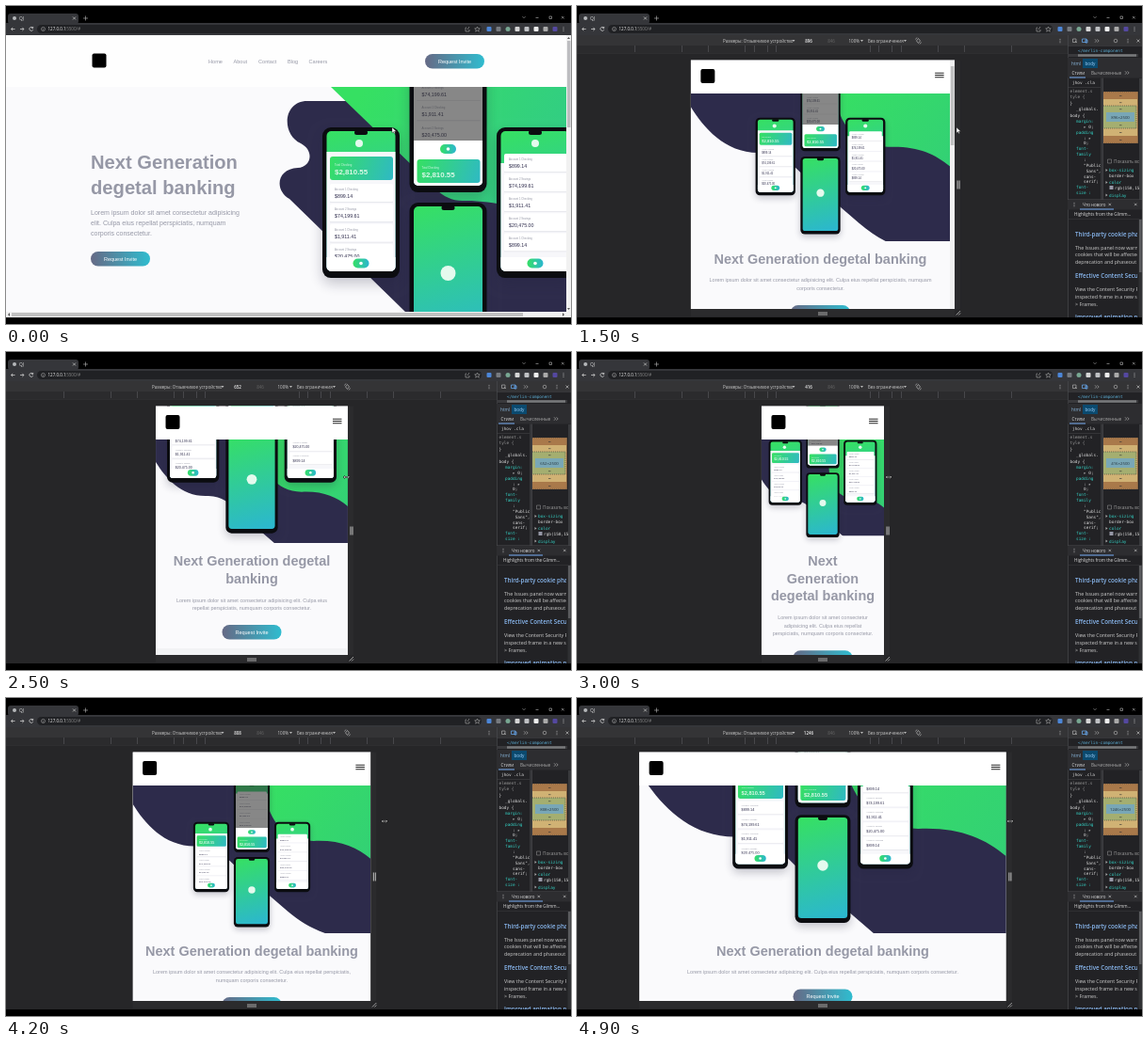
Write an HTML page with a canvas that moves like this. It is 600 by 338 pixels and loops after 5 s.

```html
<!DOCTYPE html>
<html lang="en">
<head>
<meta charset="utf-8">
<title>Responsive banking page</title>
<style>
html, body { margin: 0; width: 100%; height: 100%; overflow: hidden; background: #000; }
canvas { display: block; }
</style>
</head>
<body>
<canvas id="stage" width="600" height="338"></canvas>
<script>
const ctx = document.getElementById('stage').getContext('2d');
const LOOP = 5000, STEP = 100;
const SANS = '"Liberation Sans", Arial, sans-serif';
const UI = '"Open Sans", sans-serif';
const MONO = '"DejaVu Sans Mono", monospace';
const GRAY = '#9698a6', NAVY = '#2d2b4b', GREEN = '#36e062', TEAL = '#2bb5d3', PAPER = '#fafafc';
const LOREM = 'Lorem ipsum dolor sit amet consectetur adipisicing elit. Culpa eius repellat perspiciatis, numquam corporis consectetur.';
const TITLE = 'Next Generation degetal banking';

// Viewport width in CSS pixels and pointer position over time.
const WIDTHS = [[1600, 896], [2200, 794], [3000, 416], [3200, 400], [3600, 524], [4200, 808], [4900, 1246]];
const POINTER = [[1200, 410], [1500, 403], [1600, 403], [2200, 380], [3000, 331], [3200, 329], [3600, 351], [4200, 402], [4900, 460]];

function track(keys, t) {
  if (t <= keys[0][0]) return keys[0][1];
  for (let i = 1; i < keys.length; i++) {
    const [t0, a] = keys[i - 1], [t1, b] = keys[i];
    if (t <= t1) return a + (b - a) * (t - t0) / (t1 - t0);
  }
  return keys[keys.length - 1][1];
}

function rect(x, y, w, h, fill, r = 0) {
  ctx.fillStyle = fill;
  ctx.beginPath();
  ctx.roundRect(x, y, w, h, r);
  ctx.fill();
}

function dot(x, y, r, fill) {
  rect(x - r, y - r, 2 * r, 2 * r, fill, r);
}

function stroke(path, color, width = 1) {
  ctx.strokeStyle = color;
  ctx.lineWidth = width;
  ctx.stroke(new Path2D(path));
}

function fillPath(path, fill) {
  ctx.fillStyle = fill;
  ctx.fill(new Path2D(path));
}

function clipped(x, y, w, h, draw, r = 0) {
  ctx.save();
  ctx.beginPath();
  ctx.roundRect(x, y, w, h, r);
  ctx.clip();
  draw();
  ctx.restore();
}

// y is the vertical middle of the line.
function text(s, x, y, size, color, { font = SANS, weight = 400, align = 'left' } = {}) {
  ctx.font = `${weight} ${size}px ${font}`;
  ctx.textAlign = align;
  ctx.fillStyle = color;
  ctx.fillText(s, x, y + size * 0.35);
}

function wrap(s, size, weight, maxWidth) {
  ctx.font = `${weight} ${size}px ${SANS}`;
  const lines = [];
  for (const word of s.split(' ')) {
    const joined = lines.length ? lines[lines.length - 1] + ' ' + word : word;
    if (lines.length && ctx.measureText(joined).width <= maxWidth) lines[lines.length - 1] = joined;
    else lines.push(word);
  }
  return lines;
}

function gradient(x0, y0, x1, y1, from, to) {
  const g = ctx.createLinearGradient(x0, y0, x1, y1);
  g.addColorStop(0, from);
  g.addColorStop(1, to);
  return g;
}

function button(x, y) {
  rect(x, y, 63, 15.5, gradient(x, 0, x + 63, 0, '#666a86', '#2fbccf'), 7.8);
  text('Request Invite', x + 31.5, y + 7.8, 5.5, '#fff', { align: 'center' });
}

// Phones are drawn on an 82 x 160 grid.
function payButton(y) {
  rect(32.5, y - 5, 17, 10, gradient(32, y, 50, y, GREEN, TEAL), 5);
  dot(41, y, 1.8, '#fff');
}

function balanceCard(y) {
  rect(8, y, 67, 25, gradient(8, y, 75, y + 25, GREEN, '#2fb9c4'), 3);
  text('Total Checking', 13, y + 9, 2.8, '#d6f7e4');
  text('$2,810.55', 13, y + 16.5, 7.9, '#d9f8e6', { weight: 700 });
}

function rows(amounts, y, pitch) {
  amounts.forEach((amount, i) => {
    const mid = y + i * pitch;
    rect(8, mid - 13, 67, 19, '#fff', 2);
    rect(8, mid + 6, 67, 0.8, '#e3e4ea');
    text(i % 2 ? 'Account 2 Savings' : 'Account 1 Checking', 13, mid - 7, 2.8, GRAY);
    text(amount, 13, mid, 5.3, NAVY);
  });
}

const SCREENS = {
  splash() { dot(41, 75, 8, '#e4faee'); },
  accounts() {
    dot(39, 17, 4, '#e4faee');
    rect(0, 26, 82, 140, '#f7f7fa');
    balanceCard(31);
    rows(['$899.14', '$74,199.61', '$1,911.41', '$20,475.00'], 73, 21.3);
    rect(0, 138, 82, 22, '#fff');
    payButton(144.5);
  },
  list() {
    dot(41, 17, 4, '#e4faee');
    rect(0, 38, 82, 122, '#f7f7fa');
    rows(['$899.14', '$74,199.61', '$1,911.41', '$20,475.00', '$899.14'], 41, 21.1);
    rect(0, 138, 82, 22, '#fff');
    payButton(144.5);
  },
  sheet() {
    rect(0, 26, 82, 134, '#fff');
    rows(['$899.14', '$74,199.61', '$1,911.41', '$20,475.00'], 34.5, 21.4);
    rect(0, 0, 82, 105, 'rgba(45,45,45,.57)');
    rect(0, 105, 82, 55, '#fff');
    payButton(114);
    balanceCard(125);
  }
};

function phone(x, y, width, screen) {
  ctx.save();
  ctx.translate(x, y);
  ctx.scale(width / 82, width / 82);
  ctx.shadowColor = 'rgba(30,30,60,.25)';
  ctx.shadowBlur = width / 6;
  ctx.shadowOffsetY = width / 14;
  rect(0, 0, 82, 160, '#0b0c10', 9);
  ctx.shadowColor = 'transparent';
  clipped(4.5, 4, 73, 149, () => {
    rect(0, 0, 82, 160, gradient(20, 0, 62, 160, GREEN, TEAL));
    SCREENS[screen]();
  }, 5);
  rect(34, 3, 14, 5, '#0b0c10', 2.5);
  ctx.restore();
}

// x, y: top left corner of the middle lower phone.
function phones(x, y, width) {
  const pitch = width * 1.128;
  phone(x, y - width * 2.085, width, 'sheet');
  phone(x - pitch, y - width * 0.975, width, 'accounts');
  phone(x + pitch, y - width * 0.975, width, 'list');
  phone(x, y, width, 'splash');
}

function browser() {
  rect(0, 0, 600, 338, '#000');
  rect(2, 8, 75, 11, '#35363a', 3);
  rect(0, 18, 600, 13, '#35363a');
  dot(9, 13, 2, '#b5b7ba');
  text('QJ', 14, 13, 4.8, '#ddd', { font: UI });
  stroke('M71 11.5l3 3m0-3l-3 3', '#ccc', 0.7);
  stroke('M82 13h5m-2.5-2.5v5M548.5 11.2l1.5 1.5 1.5-1.5M562.5 12.5h3M577 11h2.500v2.500h-2.500zM590 11l2.500 2.500m0-2.500l-2.500 2.500', '#bbb', 0.6);
  stroke('M9.500 24.500h-4l1.700-1.700m-1.700 1.700l1.700 1.700M15 24.500h4l-1.700-1.700m1.700 1.700l-1.700 1.700', '#ccc', 0.8);
  stroke('M28.500 23.200a2 2 0 1 0 .2 2M28.700 21.900v1.700h-1.700', '#ccc', 0.8);
  rect(33, 20, 472, 9, '#202124', 4.5);
  stroke('M37.5 24.5a2 2 0 1 0 4 0a2 2 0 1 0-4 0m2-.3v1.300', '#aaa', 0.6);
  text('127.0.0.1', 44.500, 24.5, 4.500, '#eee', { font: UI });
  text(':5500/#', 63, 24.5, 4.500, '#888', { font: UI });
  stroke('M489 23h-1v4h4v-2m-2 0l2-3', '#999', 0.7);
  stroke('M500.5 22l.8 1.8 2 .1-1.5 1.3.5 2-1.8-1.1-1.8 1.1.5-2-1.5-1.3 2-.1z', '#aaa', 0.6);
  ['#4c86d8', '#777b80', '#78a792', '#d6d6d6', '#bfc1c4', '#eee', '#aaa', '#5548a0'].forEach((c, i) =>
    i === 2 ? dot(533, 24.5, 2.5, c) : rect(510.5 + i * 10, 22, 5, 5, c, 1));
  [22.7, 24.5, 26.3].forEach(y => dot(592, y, 0.5, '#ccc'));
}

function desktop() {
  rect(0, 31, 595, 294, PAPER);
  clipped(0, 86, 595, 239, () => {
    fillPath('M375 101H320C294 101 292 136 313 146C328 154 324 171 310 172C287 173 285 196 301 205L424 325H600V101Z', NAVY);
    fillPath('M345 86H600V217C545 218 519 206 485 207C462 207 451 188 436 174Z',
      gradient(380, 90, 590, 220, GREEN, '#31c98a'));
    phones(428.5, 209, 82);
  });
  rect(0, 31, 595, 55, '#fefefe');
  rect(91.5, 50.5, 15, 15, '#000', 2);
  [['Home', 215], ['About', 241.5], ['Contact', 268], ['Blog', 299], ['Careers', 321.5]].forEach(([s, x]) =>
    text(s, x, 59.3, 5.6, GRAY));
  button(445, 51);
  text('Next Generation', 90, 166, 20.2, GRAY, { weight: 700 });
  text('degetal banking', 90, 193, 20.2, GRAY, { weight: 700 });
  ['Lorem ipsum dolor sit amet consectetur adipisicing', 'elit. Culpa eius repellat perspiciatis, numquam', 'corporis consectetur.']
    .forEach((s, i) => text(s, 90, 220 + i * 10.6, 7.04, GRAY));
  button(90, 261);
  rect(595, 31, 5, 300, '#f1f1f1');
  rect(596, 37, 3.5, 92, '#bdbdc0');
  rect(0, 325, 595, 6, '#f1f1f1');
  rect(6, 326, 543, 4, '#c1c1c1');
  fillPath('M4 326v4l-2-2zM591 326v4l2-2zM596 35h3l-1.5-2zM596 321h3l-1.5 2z', '#555');
}

// Wave artwork: coordinates are fractions of the page width.
function waves(left, width, wide) {
  const mid = wide ? 176 : 168;
  const bottom = wide ? 250 : Math.min(203, mid + 0.21 * width);
  clipped(left, 93, width, bottom - 93, () => {
    ctx.translate(left, mid);
    ctx.scale(width, width);
    fillPath('M0-1V-.25C.05-.17 .13-.073 .26-.073C.34-.073 .37-.05 .43 .01L.65 .2C.72 .26 .78 .29 .9 .32L1 .5V-1Z', NAVY);
    fillPath('M.55-1V-.34C.56-.2 .62-.1 .76-.095C.87-.1 .94-.07 1-.02V-1Z',
      gradient(0.55, -0.35, 1, 0, GREEN, '#33d075'));
  });
}

function page(left, right, px, scrollbar) {
  const fullWidth = right - left;
  if (scrollbar) right -= 5;
  const width = right - left, center = (left + right) / 2, wide = px > 800;
  rect(left, 57.5, fullWidth, 264.5, PAPER);
  clipped(left, 57.5, fullWidth, 264.5, () => {
    waves(left, width, wide);
    const size = fullWidth * (wide ? 0.151 : 0.271);
    const foot = wide ? 243 - (fullWidth - 266) * 0.033 : 197 - (fullWidth - 130) * 0.06;
    phones(center - size / 2, foot - size * 1.95, size);

    let y = wide ? 268.5 : 222;
    const heading = { weight: 700, align: 'center' };
    wrap(TITLE, 14.47, 700, fullWidth - 19).forEach((s, i) => {
      if (i) y += 18.6;
      text(s, center, y, 14.47, GRAY, heading);
    });
    y += 23;
    wrap(LOREM, 5.47, 400, fullWidth * 0.855).forEach((s, i) => {
      if (i) y += 8.5;
      text(s, center, y, 5.47, GRAY, { align: 'center' });
    });
    button(center - 31.5, y + 18);
    rect(left, y + 43, width, 60, '#f2f3f5');
    text('Why choose HazeBank ?', center, y + 62, 14.47, GRAY, heading);

    rect(left, 57.5, width, 35.5, '#fff');
    rect(left + 10.5, 67, 15, 15, '#000', 2);
    [70.8, 73, 75.2].forEach(ly => rect(right - 16, ly, 9.5, 1, '#222'));
    if (scrollbar) {
      rect(right, 57.5, 5, 264.5, '#f1f1f1');
      rect(right + 0.7, 64, 3.6, 84, '#c1c1c1');
    }
  });
}

function deviceArea(t) {
  const px = Math.round(track(WIDTHS, t)), half = px * 0.1564;
  const left = 261 - half, right = 261 + half;
  rect(0, 31, 521, 300, '#262628');
  rect(0, 31, 600, 11, '#343436');
  rect(0, 42, 521, 8, '#2b2b2d');
  for (const d of [50, 59, 73, 83, 122, 150, 200])
    for (const side of [-1, 1]) rect(261 + side * d, 42, 0.8, 7, '#505053');
  rect(0, 50, 521, 0.6, '#363639');

  const label = { font: UI };
  text('Размеры: Отзывчивое устройство', 155, 37, 4.5, '#ccc', label);
  text(px, 246, 37, 4.5, '#eee', { font: UI, weight: 600, align: 'center' });
  text('846', 270, 37, 4.5, '#666', { font: UI, align: 'center' });
  text('100%', 288.5, 37, 4.5, '#ccc', label);
  text('Без ограничения', 309, 37, 4.5, '#ccc', label);
  [228.5, 301, 347].forEach(x => fillPath(`M${x} 36h3l-1.5 2z`, '#bbb'));
  stroke('M360.500 37l2-2.500 2 2.500-2 2.500zM359.500 35.500l1.500-2M365.500 38.500l-1.500 2', '#bbb', 0.7);
  [35.2, 37, 38.8].forEach(y => { dot(513, y, 0.5, '#bbb'); dot(585, y, 0.5, '#bbb'); });

  page(left, right, px, t < 1700);
  rect(right, 57.5, 6, 264.5, '#2b2b2d');
  rect(left, 322, 2 * half, 8, '#2b2b2d');
  rect(right + 2.4, 185.5, 1.2, 9, '#aaa');
  rect(right + 4.4, 185.5, 1.2, 9, '#aaa');
  rect(256, 325.5, 10, 1, '#aaa');
  rect(256, 327.5, 10, 1, '#aaa');
  stroke(`M${right + 1.5} 328.5l4.5-4.5m0 2.5l-2 2`, '#bbb', 0.8);
}

function boxModel(t) {
  rect(559, 91, 37, 55, '#a9794a');
  rect(559, 99, 36, 39, '#d0b274');
  rect(559, 106, 35, 24, '#a4ae70');
  rect(562, 113, 30, 10, '#79a7b6');
  ctx.setLineDash([1, 1]);
  stroke('M559 91h36.5v55h-36.5M559 106h35v24h-35', '#333', 0.6);
  ctx.setLineDash([]);
  text(Math.round(track(WIDTHS, t)) + '×2500', 577, 118, 4.3, '#24323a', { font: UI, align: 'center' });
  [95, 102.5, 109.5, 126.5, 134, 142].forEach(y => rect(576, y, 2.5, 0.6, '#333'));
}

function inspector(t) {
  const loaded = t >= 1000;
  const mono = (s, x, y, c) => text(s, x, y, 4.4, c, { font: MONO });
  const ui = (s, x, y, c, size = 4.7, weight = 400) => text(s, x, y, size, c, { font: UI, weight });
  rect(521, 42, 79, 289, '#222225');
  rect(521, 31, 0.7, 300, '#4a4b4e');
  stroke('M526.5 34.5h-24', 'transparent');
  stroke('M526.5 35h3.5v3.5h-3.500zM529 37l2 2', '#aaa', 0.7);
  stroke('M536.5 35h4.500v3.500h-4.500zM540 36h2v3h-2z', '#6bb0fa', 0.7);
  stroke('M550 35.300l1.700 1.700-1.700 1.700m2.500-3.400l1.700 1.700-1.700 1.700M570.200 37a1.800 1.800 0 1 0 3.600 0a1.800 1.800 0 1 0-3.600 0', '#aaa', 0.7);
  stroke('M594.500 35.500l3 3m0-3l-3 3', '#bbb', 0.7);
  rect(521, 42, 79, 0.6, '#4a4b4e');

  if (loaded) {
    mono('</merlin-component', 532, 47, '#5db0d7');
    rect(521, 51, 75, 3, '#3a3a3d');
    rect(532, 51.3, 62, 2.4, '#77787b');
    rect(521, 55, 79, 11, '#2d2d30');
    rect(537, 56, 16, 10, '#0b4a6f');
    ui('html', 525, 61, '#8bb9df');
    ui('body', 539.5, 61, '#9fd3ff');
  }
  rect(521, 66, 79, 10.5, '#2d2d30');
  ui('Стили', 525.5, 71, '#ddd');
  ui('Вычисленные', 546, 71, '#aaa');
  rect(523, 75.5, 17, 1, '#78aef5');
  stroke('M582 69.3l1.7 1.7-1.7 1.7m2.5-3.4l1.7 1.7-1.7 1.7', '#aaa', 0.7);
  mono('jhov .cla', 526, 81.5, '#ddd');
  rect(521, 86, 35, 0.5, '#46474a');

  if (loaded) {
    clipped(521, 86, 35, 120, () => {
      ['element.s', 'tyle {', '}', '_globals.', 'body {'].forEach((s, i) =>
        mono(s, i === 3 ? 530 : 523.5, 90 + i * 6.6, i < 2 ? '#999' : '#ddd'));
      [['margin:', 1], ['▸ 0;', 0], ['padding', 1], [': ▸', 0], ['0;', 0], ['font-', 1], ['family', 1], [':', 0],
        ['"Public', 0], [' Sans",', 0], ['sans-', 0], ['serif;', 0], ['font-', 1], ['size :', 1]]
        .forEach(([s, isName], i) => mono(s, isName ? 530 : 538, 122.5 + i * 5.85, isName ? '#35d4c7' : '#ddd'));
    });
    boxModel(t);
  }
  rect(556, 76.5, 3, 129.5, '#343538');
  rect(558.5, 76.5, 0.5, 129.5, '#4a4b4e');
  stroke('M563.5 163h4v4h-4z', '#888', 0.6);
  clipped(559, 155, 38, 51, () => {
    ui('Показать все', 570, 165, '#999');
    if (loaded) {
      mono('box-sizing', 565, 174.5, '#35d4c7');
      mono('border-box', 565, 180.5, '#ddd');
      mono('color', 565, 187.5, '#35d4c7');
      rect(565.5, 191, 4, 4, GRAY);
      mono('rgb(150,152', 571, 193, '#ddd');
      mono('display', 565, 201, '#35d4c7');
      [174.5, 187.5, 201].forEach(y => fillPath(`M561.5 ${y - 1.5}v3l2-1.5z`, '#aaa'));
    } else {
      ui('Светлоголубые', 562, 176, '#666');
      ui('Отображаемые', 562, 186, '#ddd');
    }
  });
  rect(597, 77, 3, 129, '#38393c');

  rect(521, 206, 79, 10.5, '#2d2d30');
  rect(521, 205.5, 79, 0.6, '#4a4b4e');
  [209.2, 211, 212.8].forEach(y => dot(528, y, 0.5, '#bbb'));
  ui('Что нового', 537, 211, '#ddd', 4.5);
  stroke('M564.5 209.7l2.5 2.5m0-2.5l-2.5 2.5M592 209.7l2.5 2.5m0-2.5l-2.5 2.5', '#bbb', 0.7);
  rect(534, 215.5, 36, 1, '#78aef5');
  ui('Highlights from the Glimm...', 528, 221.5, '#ddd', 4.6);
  rect(521, 226.5, 79, 0.5, '#3c3d40');
  clipped(521, 227, 74, 104, () => {
    [['Third-party cookie phaseout', 242.5], ['Effective Content Security', 287], ['Improved animation panel', 331]]
      .forEach(([s, y]) => ui(s, 529, y, '#8ab9f1', 6.2, 600));
    [['The Issues panel now warns', 257], ['cookies that will be affected', 264.5], ['deprecation and phaseout of', 272],
      ['View the Content Security Policy', 301], ['inspected frame in a new section', 309], ['> Frames.', 317]]
      .forEach(([s, y]) => ui(s, 529, y, '#ccc', 5.3));
  });
  rect(596.5, 227, 3.5, 104, '#2f3033');
  rect(597, 227, 2.5, 56, '#5a5b5e');
}

function pointer(t) {
  const x = track(POINTER, t);
  if (t < 1600) {
    const arrow = `M${x} 129v6l1.5-1.3 1 2 .9-.4-.9-2h2z`;
    fillPath(arrow, '#fff');
    stroke(arrow, '#222', 0.4);
    return;
  }
  const y = t < 2300 ? 129 : t < 4000 ? 133 : 131;
  const arrows = `M${x - 2.7} ${y}h5.4m-4.2-1.2l-1.2 1.2 1.2 1.2m3-2.4l1.2 1.2-1.2 1.2`;
  stroke(arrows, '#000', 1.4);
  stroke(arrows, '#fff', 0.6);
}

function frame(now) {
  const t = Math.floor((now % LOOP) / STEP) * STEP;
  browser();
  if (t < 300) {
    desktop();
  } else {
    deviceArea(t);
    inspector(t);
  }
  pointer(t);
  rect(0, 331, 600, 7, '#000');
  requestAnimationFrame(frame);
}
requestAnimationFrame(frame);
</script>
</body>
</html>
```
